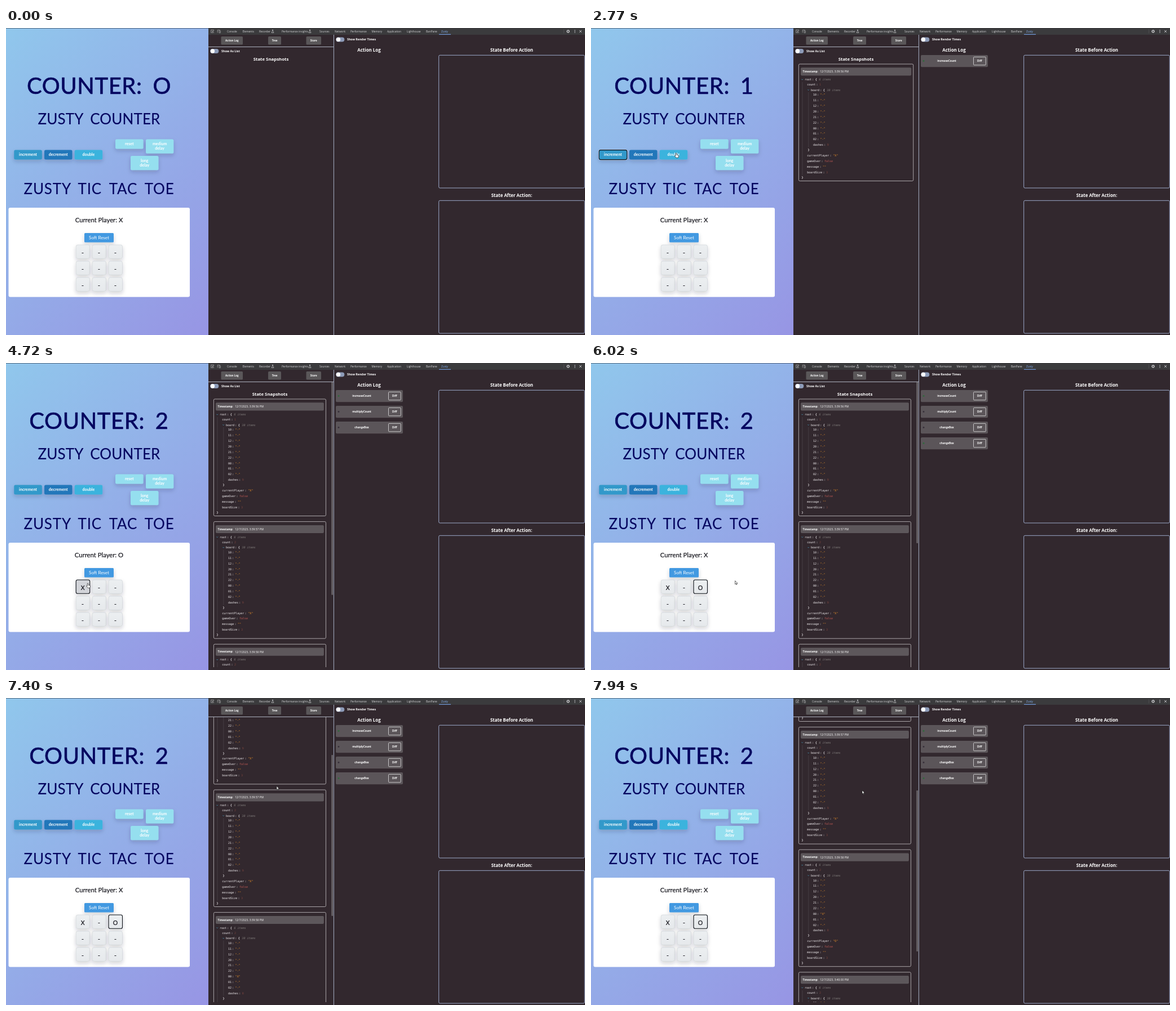
An HTML page for the animation above (8000 ms loop, 1027x545 px).

```html
<!DOCTYPE html>
<html lang="en">
<head>
<meta charset="utf-8">
<title>Zusty state inspector</title>
<style>
html, body { margin: 0; width: 100%; height: 100%; overflow: hidden; background: #32282e; }
svg { display: block; width: 100%; height: 100%; }
text { white-space: pre; }
.ui { font-family: "Open Sans", "Noto Sans", sans-serif; fill: #fff; }
.bold { font-weight: 700; }
.tab { fill: #d6d6d8; }
.active { fill: #86b4f8; }
.mono { font-family: "DejaVu Sans Mono", "Liberation Mono", monospace; fill: #f4f1f3; }
.hand { font-family: Lato, "Open Sans", sans-serif; }
.head { fill: #04045f; stroke: #04045f; stroke-linejoin: round; font-weight: 400; }
.dark { fill: #15151c; stroke: #15151c; stroke-width: .2; }
.white { fill: #fff; }
.str { fill: #f0952a; }
.num { fill: #7d453f; }
.bool { fill: #c25a55; }
.dim { fill: #85807f; font-style: italic; }
.mid { text-anchor: middle; }
</style>
</head>
<body>
<svg id="stage" viewBox="0 0 1027 545" preserveAspectRatio="none">
  <defs>
    <linearGradient id="sky" gradientUnits="userSpaceOnUse" x1="-46.5" y1="46.5" x2="405.5" y2="498.5">
      <stop stop-color="#90c7ec"/><stop offset="1" stop-color="#9795e4"/>
    </linearGradient>
    <linearGradient id="key" x2="0" y2="1">
      <stop stop-color="#eceff1"/><stop offset="1" stop-color="#e6e9ec"/>
    </linearGradient>
    <filter id="shade" x="-40%" y="-50%" width="180%" height="250%">
      <feDropShadow dx="0" dy="3.5" stdDeviation="3.5" flood-color="#223" flood-opacity=".2"/>
    </filter>
    <clipPath id="pane"><rect x="359" y="34" width="222" height="506"/></clipPath>
  </defs>
  <g id="app"></g>
  <g id="tools"></g>
  <g clip-path="url(#pane)"><g id="list"></g><rect id="thumb" x="577.3" width="2.8" rx="1.2" fill="#6c676b"/></g>
  <g id="log"></g>
  <g id="ring" fill="none">
    <rect id="ringOuter" rx="3.2" stroke="#fff" stroke-opacity=".7" stroke-width=".5"/>
    <rect id="ringInner" rx="2.8" stroke="#0d1117" stroke-width="1.1"/>
  </g>
  <g id="cursor" stroke="#111" stroke-width=".65" stroke-linejoin="round" fill="#fff">
    <path id="arrow" d="M0 0V6.2L1.5 4.9 2.4 6.9 3.4 6.5 2.5 4.5H4.4z"/>
    <path id="pointer" d="M0 .2c.8 0 1 .5 1 1v2l2.6.6c.7.2 1 .6.9 1.3L4 7.4c-.1.5-.4.9-.9.9H.6c-.5 0-.8-.2-1.1-.6l-2-2.8c.6-.8 1.2-.4 1.6.1V1.2C-.9.6-.6.2 0 .2z"/>
  </g>
</svg>
<script>
const LOOP = 8000;
const $ = id => document.getElementById(id);

// Markup helpers; text is placed by its visual middle line.
const label = (x, y, str, size, cls, extra = '') =>
  `<text x="${x}" y="${y + size * 0.36}" font-size="${size}" class="${cls}" ${extra}>${str}</text>`;
const box = (x, y, w, h, r, fill, extra = '') =>
  `<rect x="${x}" y="${y}" width="${w}" height="${h}" rx="${r}" fill="${fill}" ${extra}/>`;
const line = (d, color, width = 0.6) =>
  `<path d="${d}" fill="none" stroke="${color}" stroke-width="${width}"/>`;

// ---- demo app -------------------------------------------------
const SHADE = 'filter="url(#shade)"';
const buttons = [
  [14.3, 216.6, 49.5, 17, '#3099ca', 'increment'],
  [68, 216.6, 49.5, 17, '#2277ba', 'decrement'],
  [121.7, 216.6, 49.5, 17, '#3bb3dd', 'double'],
  [194, 197.6, 49.7, 17, '#95dfef', 'reset'],
  [248, 197.6, 49.3, 25.2, '#95dfef', 'medium delay'],
  [221, 227, 49.5, 25.2, '#95dfef', 'long delay']
];
const cells = Array.from({ length: 9 }, (_, i) => [124.2 + i % 3 * 28.9, 385 + Math.floor(i / 3) * 29, 24.5, 24.3]);
const resetKey = [139, 364, 52, 16.5];

function buttonMarkup([x, y, w, h, fill, name]) {
  const words = name.split(' ');
  const top = y + h / 2 - 0.3 - (words.length - 1) * 4;
  return box(x, y, w, h, 2.5, fill, SHADE) +
    words.map((word, i) => label(x + w / 2, top + i * 8, word, 7.1, 'hand white bold mid')).join('');
}

function drawApp() {
  const title = (y, str, size, stroke, extra) =>
    label(165, y, str, size, 'hand head mid', `stroke-width="${stroke}" ${extra}`);
  $('app').innerHTML =
    box(0, 0, 359, 545, 0, 'url(#sky)') + box(0, 0, 359, 0.7, 0, '#3d4758') +
    title(103, '<tspan id="count"></tspan>', 40, 0.6, 'word-spacing="8" letter-spacing=".6"') +
    title(162, 'ZUSTY COUNTER', 26, 0.1, 'word-spacing="6" letter-spacing=".1"') +
    title(285.5, 'ZUSTY TIC TAC TOE', 26, 0.1, 'word-spacing="6" letter-spacing=".8"') +
    buttons.map(buttonMarkup).join('') +
    box(4.5, 319, 321.5, 158.5, 3, '#fff') +
    label(165, 341, '<tspan id="player"></tspan>', 11.3, 'hand dark mid') +
    box(...resetKey, 1.5, '#4299e1', `id="reset" ${SHADE}`) +
    label(165, 372, 'Soft Reset', 8, 'hand white mid') +
    cells.map(([x, y, w, h], i) =>
      box(x, y, w, h, 3, 'url(#key)', `id="cell${i}" stroke="#c3c8cd" stroke-width=".5" ${SHADE}`) +
      label(x + w / 2 - 0.4, y + 13.8, `<tspan id="mark${i}"></tspan>`, 10.5, 'hand dark mid')).join('');
}

// ---- inspector ------------------------------------------------
const tabs = [[392, 'Console'], [419.5, 'Elements'], [449, 'Recorder'], [489, 'Performance insights'],
  [556, 'Sources'], [583, 'Network'], [611, 'Performance'], [648.5, 'Memory'],
  [676, 'Application'], [711, 'Lighthouse'], [745, 'BanPane']];

const toggle = (x, y) =>
  box(x, y, 15, 8, 4, '#8d9bb8') + `<circle cx="${x + 4.1}" cy="${y + 4}" r="3.7" fill="#fff"/>`;
const flask = x => line(`M${x - 1} 3.4h2M${x - 0.6} 3.4v2L${x - 2} 8.4h4L${x + 0.6} 5.4v-2`, '#c8c8ca', 0.7);
const keyButton = (x, w, name) =>
  box(x, 15, w, 14.5, 1.5, '#5a5759') + label(x + w / 2, 22.3, name, 4.5, 'ui bold mid');

function drawTools() {
  $('tools').innerHTML =
    box(359, 0, 668, 545, 0, '#32282e') + box(359, 0, 668, 12, 0, '#3b3b3d') +
    line('M368 8.3h-4.3v-5h4.8v2M366 5.5l3 3M366 5.5v2M366 5.5h2', '#c8c8ca') +
    line('M375.2 8.3v-4.6h4.6M378 5h2.3v3.6h-2.3z', '#c8c8ca') +
    tabs.map(([x, name]) => label(x, 6.2, name, 4.75, 'ui tab')).join('') +
    label(772, 6.2, 'Zusty', 4.75, 'ui active') + box(768, 10.8, 21, 1, 0, '#7cacf8') +
    flask(473) + flask(539) +
    line('M989.5 2.5v7', '#5a5a5d') +
    '<circle cx="997" cy="6" r="2" fill="none" stroke="#d6d6d8" stroke-width="1.5" stroke-dasharray="1.2 .37"/>' +
    '<circle cx="997" cy="6" r="1.7" fill="none" stroke="#d6d6d8" stroke-width=".6"/>' +
    [4, 6, 8].map(y => `<circle cx="1009" cy="${y}" r=".65" fill="#d6d6d8"/>`).join('') +
    line('M1017 4l4 4M1021 4l-4 4', '#d6d6d8', 0.8) +
    keyButton(381.5, 38.5, 'Action Log') + keyButton(465, 23, 'Tree') + keyButton(532.5, 26.5, 'Store') +
    line('M359 33.5H581', '#bcc1ce', 0.9) + line('M581.4 12V545', '#a8b1c6', 1) +
    toggle(585.3, 16.4) + label(605, 20.6, 'Show Render Times', 5.25, 'ui bold') +
    label(644, 39.2, 'Action Log', 7.9, 'ui bold mid') +
    label(897, 39.2, 'State Before Action', 7.9, 'ui bold mid') +
    label(897, 297, 'State After Action:', 7.9, 'ui bold mid') +
    [48.3, 306.3].map(y => box(767.7, y, 258.6, 235.7, 2, 'none', 'stroke="#a9b9dc" stroke-width=".9"')).join('');
}

const CHAR = 3.01;
const SNAP_STEP = 217.6;
const snaps = [
  { at: 1680, time: '3:39:56', count: 1, marks: {}, player: 'X' },
  { at: 3040, time: '3:39:57', count: 2, marks: {}, player: 'X' },
  { at: 4390, time: '3:39:58', count: 2, marks: { '00': 'X' }, player: 'O' },
  { at: 5680, time: '3:40:00', count: 2, marks: { '00': 'X', '02': 'O' }, player: 'X' }
];
const mono = (x, y, str, cls = '') => label(x, y, str, 5, 'mono ' + cls);

function entry(x, y, key, value, cls) {
  const end = x + key.length * CHAR;
  return mono(x, y, key) + mono(end + 1.2, y, ':') + mono(end + 6.8, y, value, cls);
}

function branch(x, y, key, items) {
  return line(`M${x - 5.6} ${y - 0.7}l1.3 1.3 1.3-1.3`, '#4aa5c9', 0.7) + entry(x, y, key, '{', 'bold') +
    mono(x + key.length * CHAR + 13.5, y, items + ' items', 'dim');
}

function snapshot(s, i) {
  const keys = ['10', '11', '12', '20', '21', '22', '00', '01', '02'];
  const quote = v => `"${v}"`;
  const rowY = k => 118.6 + k * 9.87;
  return `<g id="snap${i}" transform="translate(0 ${i * SNAP_STEP})">` +
    box(368.4, 64, 0, 207.5, 2, 'none', 'class="frame" stroke="#c9c6c8" stroke-width=".8"') +
    box(372, 70.3, 0, 14.2, 2, '#5d575b', 'class="bar"') +
    label(375.6, 77.6, 'Timestamp:', 4.6, 'ui bold') +
    label(406, 77.6, `12/7/2023, ${s.time} PM`, 4.9, 'ui') +
    line('M375 96V261M385.8 114V212', '#5b5359', 0.5) +
    branch(379, 91.5, 'root', 6) + entry(383.2, 100.3, 'count', s.count, 'num') +
    branch(390, 110, 'board', 10) +
    keys.map((k, n) => entry(394, rowY(n), k, quote(s.marks[k] || '-'), 'str')).join('') +
    entry(394, rowY(9), 'dashes', 9 - Object.keys(s.marks).length, 'num') +
    mono(384.6, 216.4, '}', 'bold') +
    entry(383.2, 226.2, 'currentPlayer', quote(s.player), 'str') +
    entry(383.2, 236.1, 'gameOver', 'false', 'bool') +
    entry(383.2, 246, 'message', '""', 'str') +
    entry(383.2, 255.8, 'boardSize', 3, 'num') +
    mono(373.4, 264.9, '}', 'bold') + '</g>';
}

function drawLists() {
  $('list').innerHTML = toggle(362.3, 37) + label(382, 41.2, 'Show As List', 5.3, 'ui bold') +
    label(0, 55, 'State Snapshots', 7.8, 'ui bold mid', 'id="heading"') + snaps.map(snapshot).join('');
  const names = ['increaseCount', 'multiplyCount', 'changeBox', 'changeBox'];
  const dots = ['#2f6b3c', '#37303a', '#37303a', '#2f6b3c'];
  $('log').innerHTML = names.map((name, i) => {
    const y = 48 + i * 28;
    return `<g id="log${i}">` + box(585, y, 119, 21.3, 2, '#5b5559') +
      `<circle cx="590" cy="${y + 10.5}" r="1.4" fill="${dots[i]}"/>` +
      label(631, y + 10.8, name, 4.7, 'ui bold mid') +
      box(678.5, y + 3.4, 21.7, 14.4, 1.2, 'none', 'stroke="#e4e2e3" stroke-width=".8"') +
      label(689.3, y + 10.6, 'Diff', 4.7, 'ui bold mid') + '</g>';
  }).join('');
}

// ---- motion ---------------------------------------------------
const path = [[70, 952, 499], [210, 952, 499], [600, 480, 345], [1010, 80, 228], [1150, 61, 229], [1410, 55, 230],
  [1880, 55, 230], [2630, 151, 222], [3510, 151, 222], [4260, 138, 391], [4580, 138, 391], [4720, 145, 391],
  [5280, 187, 392], [5880, 187, 392], [6020, 255, 387], [6300, 420, 285], [6460, 507, 190], [6640, 480, 156.5],
  [7650, 480, 156.5], [7940, 481, 164]];
const scrolls = [[6970, 0], [7400, 118.6], [7650, 118.6], [7940, 230]];
const rings = [[1610, buttons[0]], [2960, buttons[2]], [4390, cells[0]], [5550, cells[2]]];

function along(keys, t, col) {
  if (t <= keys[0][0]) return keys[0][col];
  const i = keys.findIndex(k => k[0] > t);
  if (i < 0) return keys[keys.length - 1][col];
  const a = keys[i - 1], b = keys[i];
  return a[col] + (b[col] - a[col]) * (t - a[0]) / (b[0] - a[0]);
}
const inside = (x, y, [bx, by, w, h]) => x >= bx && x <= bx + w && y >= by && y <= by + h;
const show = (id, on) => $(id).setAttribute('visibility', on ? 'visible' : 'hidden');
const set = (el, attrs) => { for (const k in attrs) el.setAttribute(k, attrs[k]); };

function render(t) {
  const x = along(path, t, 1), y = along(path, t, 2);

  $('count').textContent = 'COUNTER: ' + (t < 1610 ? 'O' : t < 2960 ? '1' : '2');
  $('player').textContent = 'Current Player: ' + (t >= 4390 && t < 5550 ? 'O' : 'X');
  cells.forEach((cell, i) => {
    $('mark' + i).textContent = i === 0 && t >= 4390 ? 'X' : i === 2 && t >= 5550 ? 'O' : '-';
    set($('cell' + i), { fill: inside(x, y, cell) ? '#d2d4d9' : 'url(#key)' });
  });
  set($('reset'), { fill: inside(x, y, resetKey) ? '#3a8bd2' : '#4299e1' });

  const ring = rings.filter(r => t >= r[0]).pop();
  show('ring', ring);
  if (ring) {
    const [rx, ry, w, h] = ring[1];
    set($('ringInner'), { x: rx, y: ry, width: w, height: h });
    set($('ringOuter'), { x: rx - 0.8, y: ry - 0.8, width: w + 1.6, height: h + 1.6 });
  }

  const shown = snaps.filter(s => t >= s.at).length;
  const overflow = shown > 2;
  const right = overflow ? 567.4 : 571.7;
  const scroll = along(scrolls, t, 1);
  snaps.forEach((s, i) => {
    show('snap' + i, i < shown);
    show('log' + i, i < shown);
    set($('snap' + i).querySelector('.frame'), { width: right - 368.4 });
    set($('snap' + i).querySelector('.bar'), { width: right - 375.6 });
  });
  set($('heading'), { x: overflow ? 468 : 470 });
  set($('list'), { transform: `translate(0 ${-scroll})` });
  show('thumb', overflow);
  const ratio = 506 / (25 + shown * SNAP_STEP);
  set($('thumb'), { y: 34 + scroll * ratio, height: 506 * ratio });

  const hot = [...buttons, ...cells, resetKey].some(b => inside(x, y, b));
  set($('cursor'), { transform: `translate(${x} ${y})` });
  show('arrow', t >= 70 && !hot);
  show('pointer', t >= 70 && hot);
}

drawApp();
drawTools();
drawLists();
const start = performance.now();
function frame() {
  render((performance.now() - start) % LOOP);
  requestAnimationFrame(frame);
}
frame();
</script>
</body>
</html>
```
